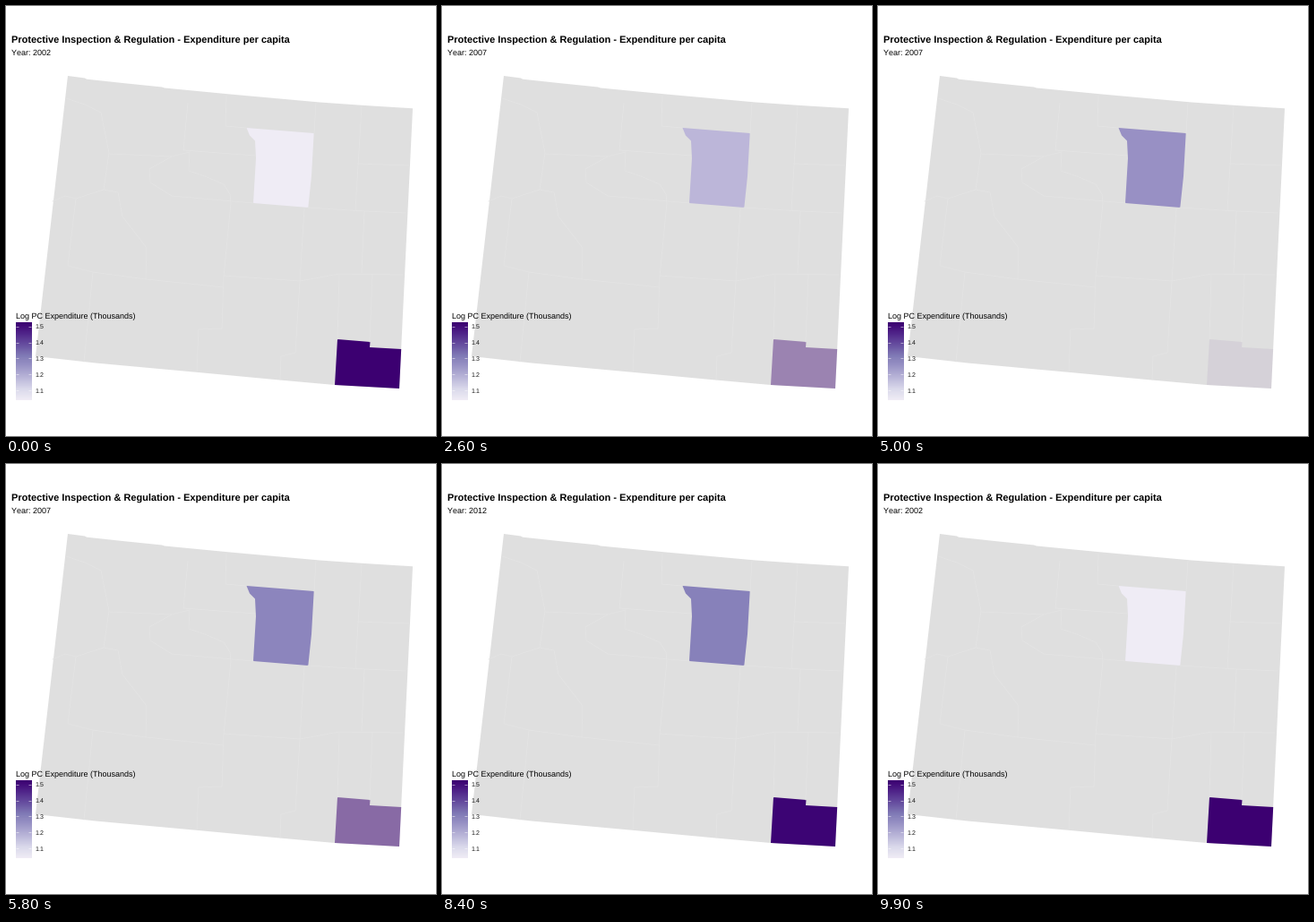
Write a matplotlib script that moves like this. It is 480 px wide and 480 px high and loops after 10 s.

```python
import matplotlib.pyplot as plt
import numpy as np
from matplotlib.animation import FuncAnimation
from matplotlib.colors import LinearSegmentedColormap, to_rgb
from matplotlib.patches import Polygon

SIZE, DPI = 480, 100
PX = 72 / DPI  # one pixel in points
FRAMES, INTERVAL = 100, 100
GREY, BORDER = "#dfdfdf", "#e4e4e4"

plt.rcParams.update({
    "font.family": "Liberation Sans",
    "text.hinting": "no_hinting",
    "text.kerning_factor": 20,  # no kerning
})

STATE = [(69, 78), (88, 80.5), (90, 81.7), (130, 86), (174, 90.5), (177, 91.5),
         (250, 98.5), (350, 107.5), (400, 111), (454, 114.3), (446.5, 270),
         (439, 427), (367, 423), (300, 417), (215, 409), (100, 398.5), (33, 391)]
NORTH = [(268.5, 136), (306, 139), (343.7, 142), (341, 190), (337.3, 225),
         (276, 220), (279, 170), (278, 150.5), (272, 144.5)]
SOUTHEAST = [(370, 372), (406.5, 375), (406, 381), (441.2, 383), (439, 427),
             (367, 423)]

COUNTY_LINES = [
    [(67, 103), (88, 110), (106, 119), (115, 164), (109, 205), (125, 208)],
    [(203, 108), (198, 161), (278, 167)],
    [(115, 165), (185, 168), (205, 163), (204, 184), (222, 190), (243, 199),
     (250, 210), (251, 220), (243, 302), (241, 360), (215, 361), (213, 408)],
    [(185, 168), (160, 182), (161, 197), (185, 212), (276, 220)],
    [(52, 218), (66, 212), (78, 215), (109, 205)],
    [(78, 215), (69, 290), (97, 297), (156, 305), (243, 314)],
    [(156, 305), (157, 270), (130, 235), (125, 208)],
    [(97, 297), (87, 397)],
    [(243, 301), (328, 307), (372, 299), (443, 300)],
    [(246, 100), (245, 134), (268, 136)],
    [(346, 108), (344, 142)],
    [(337, 225), (400, 229), (446, 231)],
    [(333, 226), (328, 307), (323, 387), (307, 391), (306, 417)],
    [(397, 112), (390, 228)],
    [(392, 176), (450, 178)],
    [(400, 229), (397, 298)],
    [(372, 300), (370, 372)],
    [(409, 300), (406, 375)],
]

PURPLES = LinearSegmentedColormap.from_list("purples", [
    "#efecf5", "#dad9eb", "#bab6d9", "#9c96c7", "#807ab6", "#674fa0",
    "#50258a", "#3c0071"])

YEARS = [2002, 2007, 2012]
NORTH_FILL = [np.array(to_rgb(c)) for c in ("#efecf5", "#9991c5", "#807ab6")]
# fill and opacity; the middle year has no data
SE_FILL = [np.array(to_rgb(c)) for c in ("#3c0071", "#3c0071", "#3c0474")]
SE_ALPHA = [1, 0, 1]
SPANS = [(16, 33), (49, 66), (83, 99)]  # last held frame, first settled frame

fig = plt.figure(figsize=(SIZE / DPI, SIZE / DPI), dpi=DPI, facecolor="white")
ax = fig.add_axes([0, 0, 1, 1])
ax.set_xlim(0, SIZE)
ax.set_ylim(SIZE, 0)
ax.axis("off")


def label(x, y, text, px, **style):
    return ax.text(x, y, text, fontsize=px * PX, va="baseline", **style)


def area(points, color):
    return ax.add_patch(Polygon(points, closed=True, fc=color, ec="none", lw=0))


area(STATE, GREY)
for line in COUNTY_LINES:
    ax.plot(*zip(*line), color=BORDER, lw=0.8 * PX)
north = area(NORTH, NORTH_FILL[0])
southeast = area(SOUTHEAST, SE_FILL[0])

label(5.5, 42, "Protective Inspection & Regulation - Expenditure per capita",
      10.95, weight="bold")
year = label(5.5, 55, "", 9)

# colour bar
LEFT, RIGHT, TOP, BOTTOM = 11, 28.3, 353.4, 439.8
label(11, 349, "Log PC Expenditure (Thousands)", 9)
ax.imshow(np.linspace(1, 0, 200)[:, None], cmap=PURPLES, aspect="auto",
          extent=(LEFT, RIGHT, BOTTOM, TOP), vmin=0, vmax=1, zorder=2)
ax.set_xlim(0, SIZE)
ax.set_ylim(SIZE, 0)
for i in range(5):
    y = 429 - 17.8 * i
    for x in (LEFT, RIGHT - 3.4):
        ax.plot([x, x + 3.4], [y, y], color="white", lw=0.5 * PX,
                solid_capstyle="butt", zorder=3)
    label(32.8, y + 2.6, f"{1.1 + 0.1 * i:.1f}", 7.2, color="#1a1a1a")


def progress(frame):
    """Position along the cycle of years, 0 to 3."""
    return sum(np.clip((frame - a) / (b - a), 0, 1) for a, b in SPANS)


def draw(frame):
    pos = progress(frame)
    i, t = int(pos) % 3, pos % 1
    j = (i + 1) % 3

    def mix(values):
        return values[i] + (values[j] - values[i]) * t

    north.set_facecolor(mix(NORTH_FILL))
    southeast.set_facecolor(mix(SE_FILL))
    southeast.set_alpha(mix(SE_ALPHA))
    # the caption switches just after the middle of a change
    year.set_text(f"Year: {YEARS[j if t > 0.54 else i]}")
    return north, southeast, year


anim = FuncAnimation(fig, draw, frames=FRAMES, interval=INTERVAL,
                     repeat=True, repeat_delay=0, blit=False)
plt.show()
```
